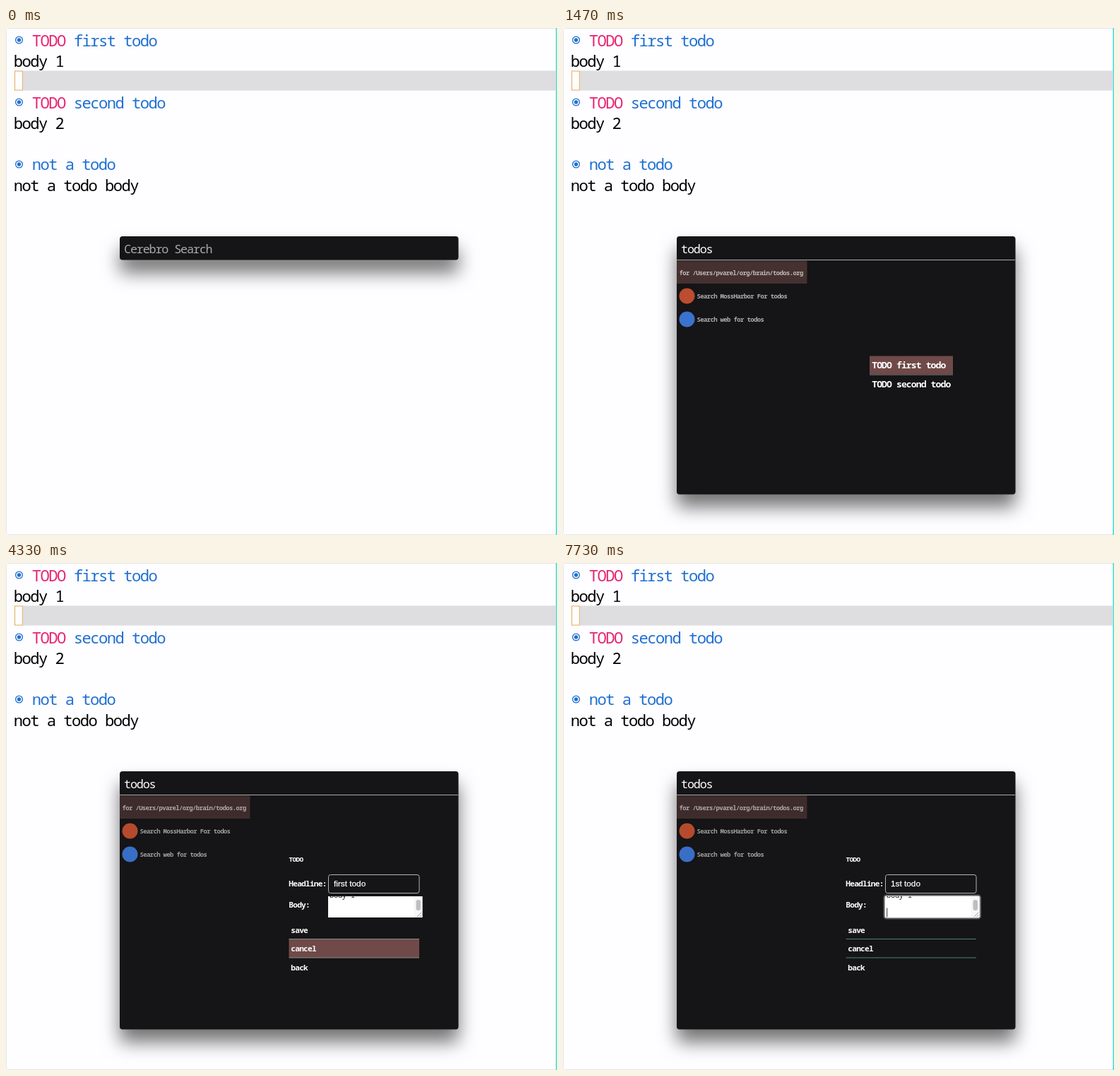
Recreate the animation shown at these times as an HTML page. Size 780 px wide and 718 px high, loop 8 s.

```html
<!DOCTYPE html>
<html lang="en">
<head>
<meta charset="utf-8">
<title>Todo search</title>
<style>
html, body { margin: 0; width: 100%; height: 100%; overflow: hidden; background: #fefdff; }
svg { display: block; }
text {
  font-family: "Noto Sans Mono", "DejaVu Sans Mono", monospace;
  font-stretch: semi-condensed;
  letter-spacing: var(--track, 0);
  white-space: pre;
}
.field { font-family: "Liberation Sans", Arial, sans-serif; font-size: 11.8px; letter-spacing: 0; }
#window { filter: drop-shadow(0 18px 13px rgba(0, 0, 0, .55)); }
</style>
</head>
<body>
<svg id="stage" width="780" height="718" viewBox="0 0 780 718">
  <g id="editor"></g>
  <g id="window"></g>
  <g id="content"></g>
</svg>
<script>
const LOOP = 8000, PITCH = .53;
const PANEL = '#151416', PICK = '#6f4a48', TEAL = '#4d8573', GRAY = '#8b8b8b';
const BLUE = '#1f70d2', PINK = '#e6246e';
const $ = id => document.getElementById(id);

// Fit the monospace advance to a constant share of the font size.
function setTracking() {
  const probe = document.createElementNS('http://www.w3.org/2000/svg', 'text');
  probe.setAttribute('font-size', 100);
  probe.textContent = '0';
  $('stage').append(probe);
  const track = PITCH - probe.getComputedTextLength() / 100;
  probe.remove();
  document.documentElement.style.setProperty('--track', track + 'em');
}

const rect = (x, y, w, h, fill, more = '') =>
  `<rect x="${x}" y="${y}" width="${w}" height="${h}" fill="${fill}" ${more}/>`;
const rule = (x1, x2, y, color) => rect(x1, y, x2 - x1, 1, color);

// Monospace text whose characters are `pitch` pixels apart.
function mono(x, y, pitch, str, fill = '#fff', weight = 600, opacity = 1) {
  const size = pitch / PITCH;
  return `<text x="${x - .06 * size}" y="${y}" font-size="${size}" font-weight="${weight}" fill="${fill}" opacity="${opacity}">${str}</text>`;
}

function editor() {
  const line = (row, x, str, fill) => mono(x, 25.6 + 29.3 * row, 11.76, str, fill, 400);
  const bullet = y =>
    `<circle cx="18.5" cy="${y}" r="4.9" fill="none" stroke="${BLUE}" stroke-width="1.3"/>` +
    `<circle cx="18.5" cy="${y}" r="2.7" fill="${BLUE}"/>`;
  return rect(.5, .5, 779, 717, '#fefdff', 'rx="3" stroke="#e5e4e7"') +
    rect(778.4, 0, 1.6, 718, '#45dcd6') +
    rect(24, 60.5, 754.4, 28, '#dedddf') +
    rect(12.5, 61, 10.8, 27, '#fefdff', 'stroke="#dcae58"') +
    [17, 105, 193].map(bullet).join('') +
    line(0, 38, 'TODO', PINK) + line(0, 97, 'first todo', BLUE) +
    line(1, 12, 'body 1', '#000') +
    line(3, 38, 'TODO', PINK) + line(3, 97, 'second todo', BLUE) +
    line(4, 12, 'body 2', '#000') +
    line(6, 38, 'not a todo', BLUE) +
    line(7, 12, 'not a todo body', '#000');
}

// Latest value of a [time, value] list at time t.
const at = (t, steps) => steps.reduce((now, [from, value]) => t >= from ? value : now, steps[0][1]);

function results(t) {
  const query = at(t, [[270, 't'], [330, 'to'], [400, 'tod'], [670, 'todos ']]);
  const word = query.trim();
  const first = t < 670 ? 'todos' : 'for /Users/pvarel/org/brain/todos.org';
  const dim = Math.min(1, Math.max(0, (t - 1200) / 330));
  const fade = low => 1 - dim * (1 - low);
  const row = (x, y, str) => mono(x, y, 4.74, str, '#fff', 600, fade(.58));
  const icon = (y, fill) => `<circle cx="175.5" cy="${y}" r="11" fill="${fill}" opacity="${fade(.8)}"/>`;
  return mono(168, 318.6, 8.9, query, '#fff', 500) +
    (t < 1200 ? rect(168 + query.length * 8.9, 302.5, 1, 20, '#eee') : '') +
    rule(161, 640, 328, '#a9a8aa') +
    rect(161, 329.5, 184.5, 32.5, PICK, `opacity="${fade(.45)}"`) +
    row(165, 349.7, first) +
    icon(379.5, '#de5833') + row(190, 383, `Search MossHarbor For ${word}`) +
    icon(412.5, '#4285f4') + row(190, 416.2, `Search web for ${word}`);
}

function todoList(t) {
  return (t >= 1200 ? rect(434, 464.5, 118, 26, PICK) : '') +
    mono(438, 482.4, 6.95, 'TODO first todo') +
    rule(434, 552, 490.6, '#777') +
    mono(438, 509, 6.95, 'TODO second todo');
}

function menu(x, right, top, items, picked) {
  return items.map((item, i) => {
    const y = top + 26.5 * i;
    return (i === picked ? rect(x, y, right - x, 26.5, PICK) : '') +
      mono(x + 3.5, y + 17.7, 5.93, item);
  }).join('') + items.slice(1).map((_, i) =>
    rule(x, right, top + 26.5 * (i + 1) - .5, picked < 0 ? TEAL : GRAY)).join('');
}

function detail(t) {
  const picked = at(t, [[2270, -1], [2870, 0], [3070, 1]]);
  return mono(449, 411.3, 5, 'TODO') +
    mono(449, 446, 8.9, 'first todo', '#fff', 700) +
    mono(449, 475.8, 5.93, 'body 1') +
    menu(448.5, 537, 490, ['mark as done', 'edit', 'delete', 'back'], picked);
}

const glow = (x, y, w, h) =>
  rect(x - 1, y - 1, w + 2, h + 2, 'none', 'rx="3" stroke="#8a8a8c" stroke-width="3" opacity=".6"') +
  rect(x, y, w, h, 'none', 'rx="2.5" stroke="#c4c4c6" stroke-width="1.5"');

const ruler = document.createElement('canvas').getContext('2d');
ruler.font = '11.8px "Liberation Sans", Arial, sans-serif';
const fieldWidth = str => ruler.measureText(str).width;

function form(t) {
  const focus = at(t, [[3730, ''], [4330, 'cancel'], [4400, 'save'], [4730, 'body'], [5130, 'headline'], [7730, 'body']]);
  const headline = at(t, [[3730, 'first todo'], [6400, '1'], [6800, '1s'], [6870, '1st'], [7000, '1st '],
    [7270, '1st t'], [7330, '1st to'], [7400, '1st tod'], [7530, '1st todo']]);
  const onHeadline = focus === 'headline', onBody = focus === 'body';
  const end = fieldWidth(headline);
  const items = ['save', 'cancel', 'back'];
  const mark = !onHeadline ? '' : t < 6400
    ? rect(464, 447.5, end, 13.5, '#51709c')
    : rect(464 + end, 447.5, 1, 13.5, '#fff');
  return mono(401, 422.8, 5, 'TODO') +
    mono(401, 458, 5.93, 'Headline:') +
    mono(401, 488.3, 5.93, 'Body:') +
    rect(456.5, 441.5, 128.5, 26, PANEL, 'rx="3" stroke="#b4b4b6"') +
    (onHeadline ? glow(456.5, 441.5, 128.5, 26) : '') + mark +
    `<text class="field" x="464" y="458" fill="#fff" stroke="#fff" stroke-width=".25">${headline}</text>` +
    (onBody ? glow(456, 472, 133.5, 30) : '') +
    `<svg x="456" y="472" width="133.5" height="30">` +
      rect(0, 0, 134, 30, '#fff') +
      mono(2.5, 1.8, 5.93, 'body 1', '#222', 500) +
      rect(121.5, 0, 12, 30, '#f7f7f7') + rule(121.5, 122.2, 0, '#e6e6e6') +
      rect(124.5, 5, 6.5, 15, '#bebebe', 'rx="3.2"') +
      '<path d="M126 29l6-6M129.500 29l2.500-2.500" stroke="#888" stroke-width=".8"/>' +
      (onBody ? rect(2.2, 16.5, 1, 13, '#333') : '') +
    '</svg>' +
    menu(400.5, 585, 506, items, items.indexOf(focus));
}

function content(t) {
  if (t < 270) return mono(168, 318.6, 8.9, 'Cerebro Search', '#aaa9ab', 400);
  const preview = at(t, [[270, () => ''], [670, todoList], [2270, detail], [3730, form]]);
  return results(t) + preview(t);
}

function show(id, markup) {
  const node = $(id);
  if (node.markup !== markup) node.innerHTML = node.markup = markup;
}

const start = performance.now();
function frame() {
  const t = Math.max(0, performance.now() - start) % LOOP;
  show('window', rect(161, 295, 479.5, t < 270 ? 33.5 : 365.5, PANEL, 'rx="4"'));
  show('content', content(t));
  requestAnimationFrame(frame);
}

setTracking();
show('editor', editor());
frame();
</script>
</body>
</html>
```
